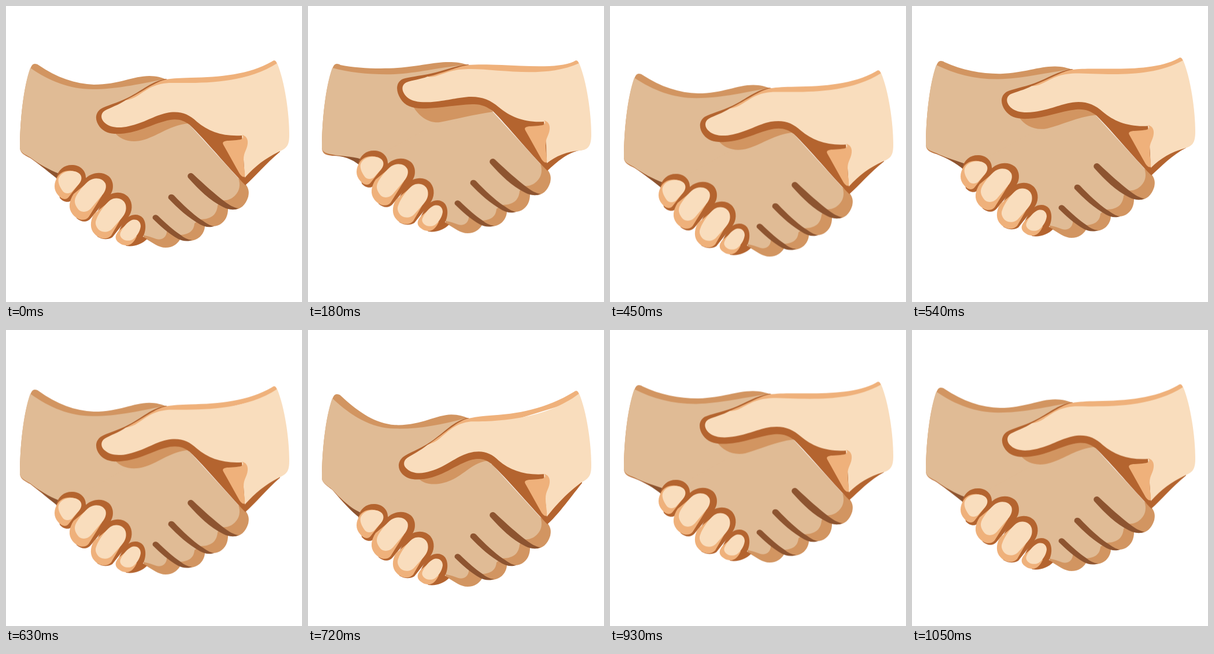
Animation of 512x512 px, one loop 1080 ms. Source, as an HTML page without scripts:

```html
<!DOCTYPE html>
<html lang="en">
<head>
<meta charset="utf-8">
<title>Handshake</title>
<style>
html, body { margin: 0; width: 100%; height: 100%; overflow: hidden; background: #fff; }
svg { display: block; width: 100%; height: 100%; }

:root {
  --tan: #e0bb95;
  --shade: #d29561;
  --line: #b4642f;
  --deep: #8d5430;
  --pale: #f9ddbd;
  --peach: #efb17b;
  /* damped swing: 0 = hands raised, 1 = rest, above 1 = lowered */
  --swing: linear(1, .933, .75, .5, .25, .067, 0,
    .091, .34, .68, 1.02, 1.269, 1.36,
    1.304, 1.15, .94, .73, .576, .52,
    .592, .79, 1.06, 1.33, 1.528, 1.6,
    1.528, 1.33, 1.06, .79, .592, .52,
    .552, .64, .76, .88, .968, 1);
}
.tan { fill: var(--tan); }
.shade { fill: var(--shade); }
.line { fill: var(--line); }
.deep { fill: var(--deep); }
.pale { fill: var(--pale); }
.peach { fill: var(--peach); }

.arms { animation: bob 1.08s cubic-bezier(.364, 0, .636, 1) infinite; }
.hand { animation: lift 1.08s var(--swing) infinite; }
.bend { animation: 1.08s var(--swing) infinite; }
#under { animation-name: under; }
#cuff { animation-name: cuff; }
#sleeve { animation-name: sleeve; }
#cast { animation-name: cast; }
#edge { animation-name: edge; }
#rim { animation-name: rim; }
#thumb { animation-name: thumb; }

@keyframes bob {
  0%, 16.667%, 100% { transform: translateY(0); }
  33.333% { transform: translateY(40px); }
  50%, 83.333% { transform: translateY(-5px); }
  66.667% { transform: translateY(11px); }
}
@keyframes lift {
  from { transform: translateY(-25px); }
  to { transform: translateY(0); }
}
@keyframes under {
  from { d: path("M24,246C25,257 32,258 42,259C60,259 76,264 90,276L100,258L40,240Z"); }
  to { d: path("M24,246C25,255 32,258 42,263C60,276 75,288 90,300L100,280L40,240Z"); }
}
@keyframes cuff {
  from { d: path("M24,246C24,200 30,140 43,106C46,99 51,99 56,102C85,108 125,109 155,107C195,104 220,96 248,97C260,97 270,100 277,102L250,120L152,130Z"); }
  to { d: path("M24,246C24,200 30,140 43,106C46,99 51,99 56,102C88,124 120,135 152,136C195,136 220,121 248,121C260,121 270,124 277,127L250,145L152,152Z"); }
}
@keyframes sleeve {
  from { d: path("M24,246C24,200 30,140 42,107C75,116 110,119 150,118C190,116 220,107 272,102L320,183L250,275L130,275L92,265C75,259 55,260 42,257C32,255 26,253 24,246Z"); }
  to { d: path("M24,246C24,200 30,140 42,107C75,130 110,144 150,144C190,144 225,136 272,127L318,207L250,300L130,300L92,290C75,284 55,272 42,262C32,256 26,254 24,246Z"); }
}
@keyframes cast {
  from { d: path("M182,174C192,190 208,203 228,201C255,196 285,188 320,183L300,165L220,165Z"); }
  to { d: path("M188,219C198,232 218,238 240,231C265,223 285,206 316,203L300,190L220,205Z"); }
}
@keyframes edge {
  from { d: path("M277,101C252,104 236,112 212,117C192,121 174,123 164,126C151,132 152,148 160,160C168,173 182,178 204,177C232,176 256,171 284,170C298,169 310,174 320,182C345,207 382,253 414,285C430,270 450,252 474,249L474,240L400,180Z"); }
  to { d: path("M277,126C252,130 236,146 212,158C192,168 174,172 164,178C153,186 154,199 162,209C170,219 182,222 198,221C232,219 256,202 284,197C298,195 308,198 318,206C345,232 382,277 414,310C430,296 450,272 474,252L474,240L400,200Z"); }
}
@keyframes rim {
  from { d: path("M469,100C467,94 464,93 460,96C435,108 380,104 335,102C310,101 290,101 277,102C258,105 240,114 205,123L230,140L300,130L469,110Z"); }
  to { d: path("M469,100C467,94 464,93 460,96C420,119 370,123 320,124C300,124.500 290,125 277,127C258,131 240,146 207,163L230,170L300,150L469,110Z"); }
}
@keyframes thumb {
  from { d: path("M469,99C482,130 490,185 490,222C490,242 485,248 472,250C448,251 428,260 413,272L412,241L408,200C375,202 350,192 330,175C315,162 300,156 278,157C255,159 240,164 212,166C195,167 180,165 172,158C162,149 160,137 170,132C180,128 195,127 207,122C215,124 222,121 228,119C245,113 255,109 282,109C330,109 410,126 469,99Z"); }
  to { d: path("M469,99C482,130 490,185 490,222C490,240 487,246 472,252C448,264 432,276 413,297L411,266L408,224C375,226 350,217 330,200C315,186 300,181 278,185C255,190 240,202 212,208C195,212 180,210 172,203C163,196 163,186 171,181C180,176 195,171 207,163C215,162 222,159 228,155C245,144 255,135 282,133C330,133 410,137 469,99Z"); }
}
</style>
</head>
<body>
<svg viewBox="0 0 512 512">
  <defs>
    <linearGradient id="dusk" gradientUnits="userSpaceOnUse" x1="24" y1="0" x2="75" y2="0">
      <stop offset="0" stop-color="#d29561"/>
      <stop offset=".35" stop-color="#b4642f"/>
      <stop offset="1" stop-color="#8d5430"/>
    </linearGradient>
  </defs>
  <g class="arms">
    <path id="under" class="bend" fill="url(#dusk)"/>
    <path id="cuff" class="bend shade"/>
    <path id="sleeve" class="bend tan"/>

    <!-- back of the hand and its fingers -->
    <g class="hand">
      <path class="shade" d="M402,298C418,308 422,318 419,330C414,346 404,353 392,352L384,351C384,362 380,372 370,378C362,382 354,382 344,380C344,390 338,399 330,403C320,408 310,406 301,404C296,412 288,418 276,418C264,418 254,410 238,400L240,330L320,280Z"/>
      <path class="tan" d="M110,290L200,240L318,206L402,298C406,309 404,320 396,328C390,334 382,337 374,336L366,345C365,358 358,369 336,369L326,376C325,388 318,396 298,396L278,384C280,398 272,406 260,403C252,400 246,398 240,397L200,370L130,310Z"/>
      <g class="deep">
        <path d="M315,297C312,291 319,286 324,291C342,308 362,326 378,338C386,344 394,349 402,350C394,354 384,352 376,348C352,336 334,318 315,297Z"/>
        <path d="M281,333C279,327 286,323 291,328C305,343 322,359 338,370C346,375 352,380 360,381C350,384 342,381 336,378C315,366 297,350 281,333Z"/>
        <path d="M254,368C252,363 258,359 263,363C275,375 290,388 302,396C308,401 314,404 322,405C312,408 304,406 298,403C282,394 266,380 254,368Z"/>
      </g>
    </g>

    <path id="cast" class="bend shade"/>
    <path id="edge" class="bend line"/>
    <path id="rim" class="bend peach"/>
    <path id="thumb" class="bend pale"/>

    <g class="hand">
      <path class="peach" d="M376,240C373,235 378,233 385,233C395,232 404,232 408,230C411,228 411,225 408,223C415,224 419,230 418,238C417,249 411,252 411,266C411,278 414,288 413,295C410,297 407,294 404,290C395,274 385,256 376,240Z"/>

      <!-- wrapped fingers: outline, underside, pad -->
      <path class="line" d="M87,298C90,282 102,274 116,275C130,276 138,286 138,296L140,302L112,337C106,341 98,338 93,332Z"/>
      <path class="peach" d="M90,294C82,306 82,318 90,327C96,335 104,336 108,331L126,308C134,298 128,286 113,285C102,284 95,288 90,294Z"/>
      <path class="pale" d="M92,296C97,287 110,283 122,287C132,291 133,300 126,308L116,319C112,325 102,326 98,320C93,313 88,303 92,296Z"/>

      <path class="line" d="M136,300C146,288 165,285 177,294C187,302 187,318 180,327L146,368C140,375 130,374 122,367L116,335Z"/>
      <path class="peach" d="M117,325C109,337 107,350 115,360C124,371 136,373 143,365L166,328L144,303Z"/>
      <path class="pale" d="M120,332C124,322 136,308 144,302C154,295 168,298 172,307C175,315 170,324 163,331L147,350C140,358 128,358 123,349C119,343 118,338 120,332Z"/>

      <path class="line" d="M170,334C182,320 202,319 212,331C220,341 219,356 211,366L184,400C176,405 166,404 158,399L153,365Z"/>
      <path class="peach" d="M152,360C145,372 145,386 153,394C162,404 175,405 182,397L201,364L180,337Z"/>
      <path class="pale" d="M156,370C160,358 172,342 180,336C190,329 204,333 207,344C209,353 206,360 200,367L183,386C176,393 163,392 158,384C155,379 154,375 156,370Z"/>

      <path class="line" d="M203,374C212,360 228,357 237,367C244,377 241,392 237,399L244,403C235,412 222,417 208,415L192,395Z"/>
      <path class="peach" d="M196,388C190,394 188,400 191,405C196,412 205,415 211,414C218,412 222,407 226,399L216,372Z"/>
      <path class="pale" d="M198,392C202,383 210,374 216,371C225,367 233,372 233,381C232,390 226,399 219,404C211,408 202,405 199,400C197,397 197,395 198,392Z"/>
    </g>
  </g>
</svg>
</body>
</html>
```
